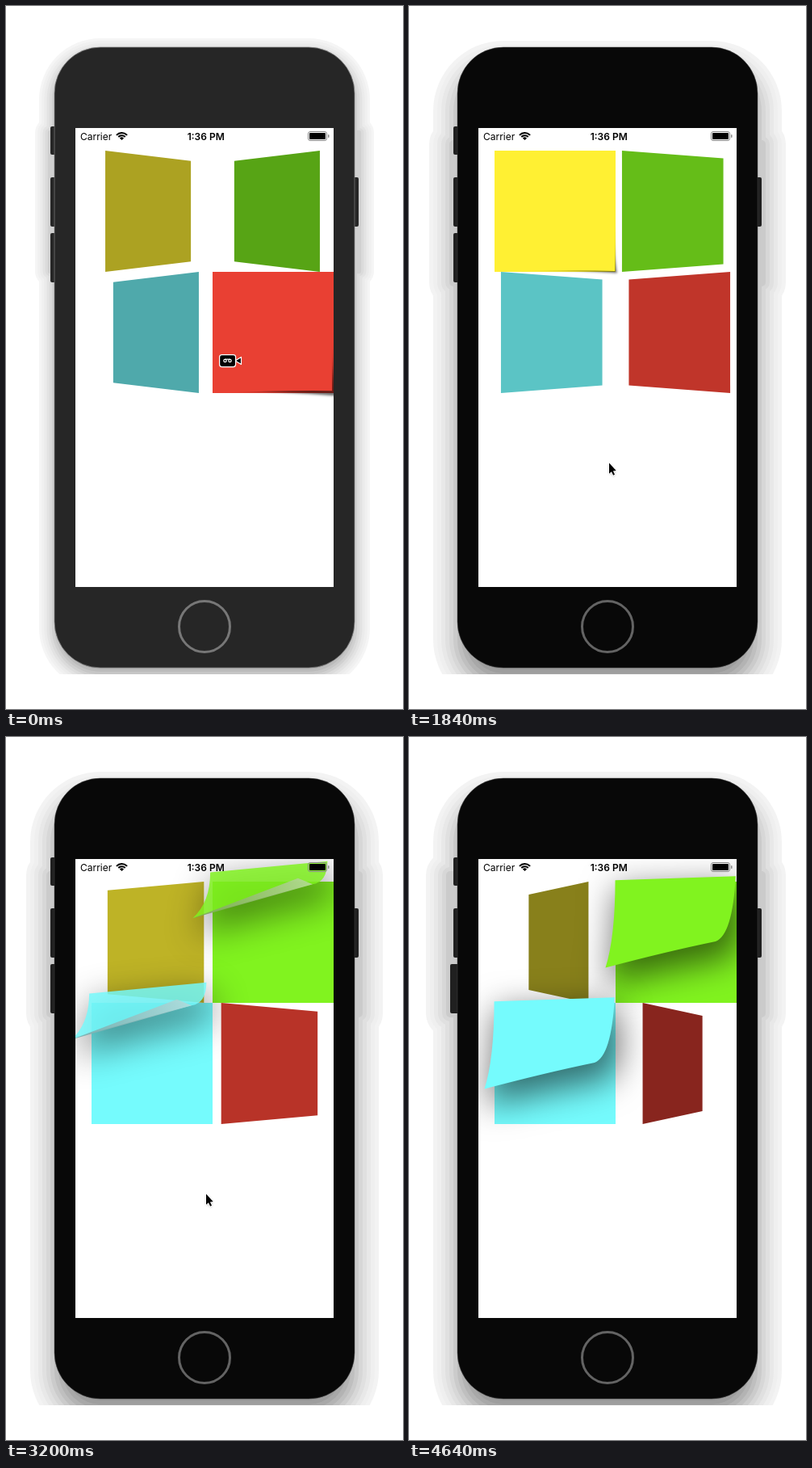
An HTML page with a canvas that plays this animation: 492 px wide and 870 px high, repeating every 4.72 s.

```html
<!DOCTYPE html>
<html lang="en">
<head>
<meta charset="utf-8">
<title>Tile transitions</title>
<style>
  html, body { margin: 0; width: 100%; height: 100%; overflow: hidden; background: #fff; }
  canvas { display: block; }
</style>
</head>
<body>
<canvas id="stage" width="492" height="870"></canvas>
<script>
const ctx = document.getElementById('stage').getContext('2d');
const LOOP = 4720, STEP = 80, SIZE = 150, DEPTH = 465, FAR_AWAY = 2000;

const tiles = [
  { rgb: [255, 240, 51], falloff: 1 },
  { rgb: [129, 243, 31], falloff: 1 },
  { rgb: [117, 251, 253], falloff: 1 },
  { rgb: [233, 64, 51], falloff: 1.15 }
];
tiles.forEach((tile, i) => {
  tile.x = 106 + SIZE * (i % 2);
  tile.y = 179 + SIZE * Math.floor(i / 2);
});

// One letter per tile: L/R = flip with that edge leading, U/D = page curl up/down.
const cycles = [
  { start: -480, length: 710, moves: 'RLLD' },
  { start: 250, length: 1220, moves: 'DUUU' },
  { start: 1514, length: 1220, moves: 'ULLR' },
  { start: 2849, length: 1220, moves: 'RDDL' },
  { start: 4166, length: 1220, moves: 'RUUL' }
];

const mix = (a, b, k) => a + (b - a) * k;
const clamp = v => Math.max(0, Math.min(1, v));
const ramp = (from, to, v) => clamp((v - from) / (to - from));
const smooth = k => k * k * (3 - 2 * k);
const tint = (rgb, grey, k) => `rgb(${rgb.map(v => Math.round(mix(v, grey, k))).join(',')})`;

// cubic-bezier(.42, 0, .58, 1)
function easeInOut(x) {
  let lo = 0, hi = 1, s = 0.5;
  for (let i = 0; i < 24; i++) {
    s = (lo + hi) / 2;
    const at = 1.26 * s * (1 - s) ** 2 + 1.74 * s * s * (1 - s) + s ** 3;
    if (at < x) lo = s; else hi = s;
  }
  return smooth(s);
}

function polygon(points, fill) {
  ctx.beginPath();
  for (let i = 0; i < points.length; i += 2) ctx.lineTo(points[i], points[i + 1]);
  ctx.closePath();
  ctx.fillStyle = fill;
  ctx.fill();
}

function roundRect(x, y, w, h, r, fill) {
  ctx.beginPath();
  ctx.roundRect(x, y, w, h, r);
  ctx.fillStyle = fill;
  ctx.fill();
}

function setShadow(alpha, blur, dx, dy) {
  ctx.shadowColor = `rgba(0,0,0,${alpha})`;
  ctx.shadowBlur = blur;
  ctx.shadowOffsetX = dx;
  ctx.shadowOffsetY = dy;
}

function drawFlip(tile, x, move) {
  let angle = Math.PI * easeInOut(x);
  let side = move === 'L' ? -1 : 1;
  if (angle > Math.PI / 2) {
    angle = Math.PI - angle;
    side = -side;
  }
  const half = SIZE / 2, cx = tile.x + half, cy = tile.y + half;
  const scale = DEPTH / (DEPTH + SIZE * Math.sin(angle));
  const near = cx + side * half * Math.cos(angle);
  const far = cx - side * half * Math.cos(angle) * scale;
  const dark = (angle * 180 / Math.PI / 121) ** tile.falloff;
  polygon([near, cy - half, far, cy - half * scale, far, cy + half * scale, near, cy + half],
    tint(tile.rgb, 0, dark));
}

function sheetPath({ topLeft, topRight, bend, tip, tail }) {
  ctx.beginPath();
  ctx.moveTo(topLeft.x, topLeft.y);
  ctx.lineTo(topRight.x, topRight.y);
  ctx.quadraticCurveTo(bend.x, bend.y, tip.x, tip.y);
  ctx.quadraticCurveTo(mix(tail.x, tip.x, 0.55), mix(tail.y, tip.y, 0.55) - 2, tail.x, tail.y);
  ctx.quadraticCurveTo(topLeft.x, mix(topLeft.y, tail.y, 0.65), topLeft.x, topLeft.y);
}

// The page first lifts one corner, then swings its lower edge up and over the top.
function curlSheet(corner, bend) {
  const rise = bend ** 0.36;
  const topRight = { x: 150 - 8 * bend, y: -26 * bend ** 0.7 };
  const tip = {
    x: 150 - 2 * corner - 24 * Math.min(1, 2 * rise),
    y: 150 - 3 * corner - 146 * rise
  };
  return {
    topLeft: { x: -3 * bend, y: -12 * bend },
    topRight,
    bend: { x: 150 - 2 * corner - 6 * rise, y: mix(topRight.y, tip.y, 0.9) },
    tip,
    tail: { x: -25 * rise, y: 150 - 107 * rise ** 1.3 }
  };
}

function curlShadow(sheet, corner, lift) {
  const inset = 4 * (1 - lift), drop = 22 * lift, spread = 7 * corner * (1 - lift);
  const shift = (p, dx, dy) => ({ x: p.x + dx, y: p.y + dy });
  return {
    topLeft: shift(sheet.topLeft, inset, inset + drop / 2),
    topRight: shift(sheet.topRight, -inset, inset + drop / 2),
    bend: shift(sheet.bend, drop - inset, drop / 2 - 5 * inset),
    tip: shift(sheet.tip, spread + drop * 0.7, spread + drop),
    tail: shift(sheet.tail, inset, drop - inset)
  };
}

function drawCurl(tile, c) {
  const paper = tint(tile.rgb, 0, 0);
  ctx.fillStyle = paper;
  ctx.fillRect(tile.x, tile.y, SIZE, SIZE);

  const corner = ramp(0.23, 0.33, c);
  if (corner === 0 || c >= 1) return;
  const bend = Math.max(0, (c - 0.33) / 0.4);
  const lift = clamp(bend * 6.5);
  const alpha = 1 - smooth(ramp(0.62, 0.98, c));
  const sheet = curlSheet(corner, bend);

  ctx.save();
  ctx.translate(tile.x, tile.y);

  ctx.save();
  ctx.translate(-FAR_AWAY, 0);
  setShadow(0.56 * clamp(1 - 1.3 * (1 - alpha)), 3 + 41 * lift, FAR_AWAY, 0);
  sheetPath(curlShadow(sheet, corner, lift));
  ctx.fillStyle = '#000';
  ctx.fill();
  ctx.restore();

  ctx.globalAlpha = alpha;
  sheetPath(sheet);
  ctx.fillStyle = paper;
  ctx.fill();

  if (bend > 0.2) {
    const { tip, tail } = sheet;
    const fold = { x: tip.x - 19 * bend, y: tip.y - 8 * bend };
    const sheen = ctx.createLinearGradient(tip.x, tip.y, tail.x, tail.y);
    sheen.addColorStop(0, tint(tile.rgb, 205, 0.75));
    sheen.addColorStop(1, tint(tile.rgb, 115, 0.65));
    polygon([tail.x, tail.y, fold.x, fold.y, tip.x, tip.y], sheen);
  }
  ctx.restore();
}

function drawTiles(t) {
  const cycle = cycles.filter(c => c.start <= t).pop();
  const x = clamp((t - cycle.start) / cycle.length);
  tiles.forEach((tile, i) => {
    const move = cycle.moves[i];
    if (move === 'U') drawCurl(tile, x);
    else if (move === 'D') drawCurl(tile, 1 - x);
    else drawFlip(tile, x, move);
  });
}

// Soft shadow in visible bands, from the outer rim inwards.
function drawPhoneShadow(active, pop) {
  const reach = active ? 30 : 19, drop = active ? 22 : 8;
  const strength = active ? 0.5 : 0.45, bands = 12;
  for (let i = 0; i <= bands; i++) {
    const d = mix(reach, -reach, i / bands);
    const cover = strength / (1 + Math.exp(2.3 * d / reach));
    const grey = tint([255, 255, 255], 0, cover);
    roundRect(60 - d, 51 - d + drop, 372 + 2 * d, 768 + 2 * d, 57 + d, grey);
    if (d > 0) roundRect(55 - pop - d, 149 - d + drop, 382 + pop + 2 * d, 171 + 2 * d, d, grey);
  }
}

function drawPhone(t) {
  const active = t >= STEP;
  const body = active ? '#080808' : '#262626';
  const key = active ? '#202020' : '#262626';
  const pop = t >= 4300 ? 4 : 0;

  ctx.save();
  ctx.beginPath();
  ctx.rect(0, 0, 492, 827);
  ctx.clip();
  drawPhoneShadow(active, pop);
  roundRect(55, 149, 8, 35, 2, key);
  roundRect(55, 212, 8, 61, 2, key);
  roundRect(55 - pop, 281, 8 + pop, 61, 2, key);
  roundRect(429, 212, 8, 61, 2, key);
  roundRect(60, 51, 372, 768, 57, body);
  ctx.strokeStyle = active ? 'rgba(70,70,70,.5)' : 'rgba(130,130,130,.7)';
  ctx.lineWidth = 1;
  ctx.stroke();
  ctx.restore();

  ctx.beginPath();
  ctx.arc(246, 768, 31.5, 0, 7);
  ctx.strokeStyle = active ? '#636363' : '#777';
  ctx.lineWidth = 3;
  ctx.stroke();
}

function drawStatusBar() {
  ctx.fillStyle = '#000';
  ctx.textAlign = 'left';
  ctx.font = '400 12px Inter, sans-serif';
  ctx.fillText('Carrier', 92, 165.5);
  ctx.textAlign = 'center';
  ctx.font = '600 12px Inter, sans-serif';
  ctx.fillText('1:36 PM', 247.7, 165.5);

  ctx.strokeStyle = '#000';
  ctx.lineWidth = 2;
  const from = -Math.PI * 0.76, to = -Math.PI * 0.24;
  for (const r of [9, 5.8]) {
    ctx.beginPath();
    ctx.arc(143.5, 166, r, from, to);
    ctx.stroke();
  }
  ctx.beginPath();
  ctx.moveTo(143.5, 166);
  ctx.arc(143.5, 166, 3.6, from, to);
  ctx.fill();

  ctx.beginPath();
  ctx.roundRect(374.5, 155.5, 23, 11, 2.5);
  ctx.strokeStyle = '#888';
  ctx.lineWidth = 1;
  ctx.stroke();
  roundRect(376, 157, 20, 8, 1, '#000');
  roundRect(399, 159, 1.5, 4, 0.7, '#888');
}

function drawCamera() {
  ctx.lineJoin = 'round';
  ctx.strokeStyle = '#fff';
  ctx.lineWidth = 1.2;
  polygon([284, 439, 291.5, 434.5, 291.5, 443.5], '#000');
  ctx.stroke();
  roundRect(264.6, 431.6, 20, 15, 3, '#000');
  ctx.stroke();
  for (const x of [271.5, 277.5]) {
    ctx.beginPath();
    ctx.arc(x, 439, 1.7, 0, 7);
    ctx.stroke();
  }
  ctx.beginPath();
  ctx.moveTo(271, 437.2);
  ctx.lineTo(278, 437.2);
  ctx.stroke();
}

// Settles below the tiles, then leaves past the volume buttons.
function cursorPosition(t) {
  const settle = ramp(STEP, 560, t), nudge = ramp(560, 800, t), leave = ramp(4000, 4480, t);
  return {
    x: mix(272, 252, settle) - 4 * nudge - 280 * leave,
    y: mix(460, 553, settle) + 12 * nudge - 425 * leave
  };
}

function drawCursor(t) {
  if (t < STEP) return drawCamera();
  const { x, y } = cursorPosition(t);
  ctx.save();
  ctx.translate(x, y + 0.5);
  ctx.scale(0.95, 0.95);
  const arrow = [0, 0, 0, 14, 3.1, 11.2, 5.4, 16, 7.4, 15, 5.2, 10.4, 9.2, 10];
  setShadow(0.4, 3, 0, 1);
  polygon(arrow, '#fff');
  setShadow(0, 0, 0, 0);
  ctx.strokeStyle = '#fff';
  ctx.lineWidth = 2;
  ctx.stroke();
  polygon(arrow, '#000');
  ctx.restore();
}

function draw(t) {
  ctx.fillStyle = '#fff';
  ctx.fillRect(0, 0, 492, 870);
  drawPhone(t);

  ctx.save();
  ctx.beginPath();
  ctx.rect(86, 151, 320, 568);
  ctx.clip();
  ctx.fillStyle = '#fff';
  ctx.fillRect(86, 151, 320, 568);
  drawTiles(t);
  drawStatusBar();
  ctx.restore();

  drawCursor(t);
}

const begin = performance.now();
function tick() {
  const t = (performance.now() - begin) % LOOP;
  draw(Math.floor(t / STEP) * STEP);
  requestAnimationFrame(tick);
}
tick();
</script>
</body>
</html>
```
